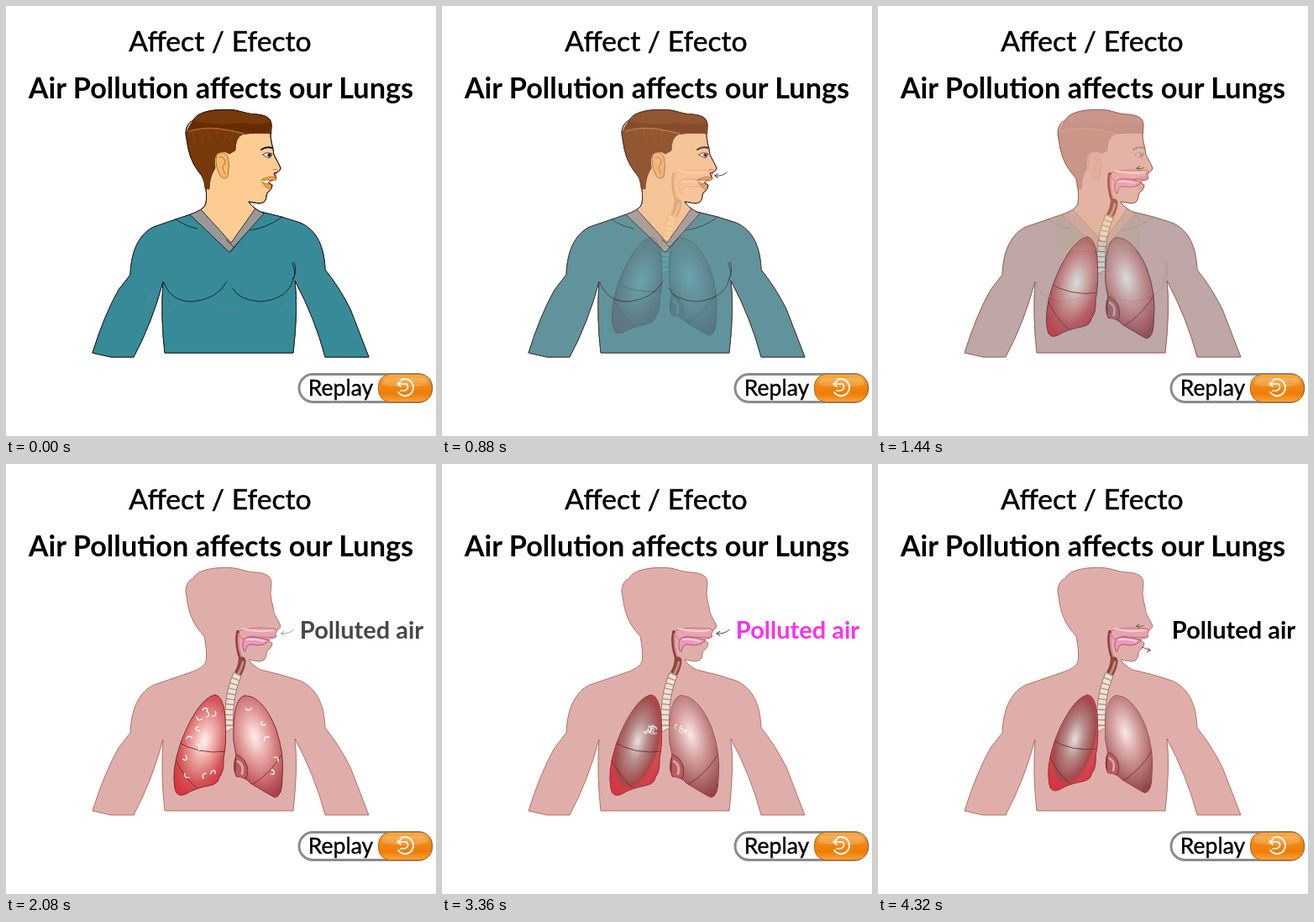
Recreate the animation shown at these times as an HTML page. Size 512 px wide and 512 px high, loop 4.4 s.

```html
<!DOCTYPE html>
<html lang="en">
<head>
<meta charset="utf-8">
<title>Affect / Efecto</title>
<style>
  html, body { margin: 0; width: 100%; height: 100%; overflow: hidden; background: #fff; }
  svg { display: block; width: 100vw; height: 100vh; }
  text { font-family: Lato, "Open Sans", sans-serif; text-anchor: middle; }
  .line { fill: none; stroke-linecap: round; stroke-linejoin: round; }
</style>
</head>
<body>
<svg viewBox="0 0 512 512">
  <defs>
    <path id="body" d="M214 152C214 142 219 138 223 136C228 126 246 123 264 123.500C277 123 285 129 298 129
      C309 130 316 133 316 142L315 155Q316 164 318 170Q318 177 321 181Q325 188 327 193Q326 198 319 199
      Q320 202 322 205Q320 208 313 208Q310 210 317 213Q317 217 314 220Q310 222 310 226Q310 235 301 235L289 233
      Q292 239 303 245Q327 250 350 258C371 267 379 288 380 314Q397 335 410 361L432 418L380 418Q368 372 344 327
      Q348 360 342 413L189 413Q184 370 187 328Q174 377 152 418L125 418L103 413Q117 368 134 338L148 320
      C149 288 161 270 176 263L214 250Q237 243 238 235Q240 225 236 205Q221 190 217 170Z"/>
    <clipPath id="inBody"><use href="#body"/></clipPath>
    <path id="lungL" d="M249 275C233 277 216 309 207 335Q197 365 201 386Q203 398 214 393Q225 386 242 383Q253 381 254 373
      Q260 366 259 350Q263 335 261 300Q258 275 249 275Z"/>
    <path id="lungR" d="M284 276C273 277 270 303 271 330L274 347Q269 360 274 372Q286 373 291 380Q309 391 320 397
      Q329 396 329 374Q332 345 321 314C311 290 298 275 284 276Z"/>
    <clipPath id="inL"><use href="#lungL"/></clipPath>
    <clipPath id="inR"><use href="#lungR"/></clipPath>
    <radialGradient id="redL" gradientUnits="userSpaceOnUse" cx="0" cy="0" r="1" gradientTransform="translate(236 330) rotate(14) scale(36 68)">
      <stop offset="0" stop-color="#fff3ef"/><stop offset=".35" stop-color="#eda9a4"/>
      <stop offset=".75" stop-color="#d45458"/><stop offset="1" stop-color="#d93440"/>
    </radialGradient>
    <radialGradient id="redR" gradientUnits="userSpaceOnUse" cx="0" cy="0" r="1" gradientTransform="translate(296 325) rotate(-14) scale(38 72)">
      <stop offset="0" stop-color="#fff0ee"/><stop offset=".4" stop-color="#e6a3a2"/>
      <stop offset=".8" stop-color="#c65f64"/><stop offset="1" stop-color="#a94349"/>
    </radialGradient>
    <radialGradient id="dirtL" gradientUnits="userSpaceOnUse" cx="0" cy="0" r="1" gradientTransform="translate(233 330) rotate(14) scale(28 62)">
      <stop offset="0" stop-color="#e9dedb"/><stop offset=".4" stop-color="#b58b89"/>
      <stop offset=".85" stop-color="#a1494b"/><stop offset="1" stop-color="#d6343f" stop-opacity=".4"/>
    </radialGradient>
    <radialGradient id="dirtR" gradientUnits="userSpaceOnUse" cx="0" cy="0" r="1" gradientTransform="translate(296 322) rotate(-14) scale(38 76)">
      <stop offset="0" stop-color="#f9e8e6"/><stop offset=".4" stop-color="#d5a09f"/><stop offset="1" stop-color="#934449"/>
    </radialGradient>
    <linearGradient id="orange" x2="0" y2="1">
      <stop offset="0" stop-color="#f7b04a"/><stop offset=".35" stop-color="#f28a18"/>
      <stop offset=".7" stop-color="#ee7d08"/><stop offset="1" stop-color="#fba43a"/>
    </linearGradient>
  </defs>

  <rect width="512" height="512" fill="#fff"/>
  <text x="255" y="53.500" font-size="33.700" stroke="#000" stroke-width=".5">Affect / Efecto</text>
  <text x="256" y="110" font-size="34.300" font-weight="700">Air Pollution affects our Lungs</text>

  <use href="#body" fill="#e0aeaa" stroke="#a5574a" stroke-width=".8"/>

  <g id="airway" class="line">
    <path d="M276 200Q285 193 320 196L323 199Q319 204 322 206Q302 207 291 205L282 209Z" fill="#e9a3ae" stroke="#b96673" stroke-width=".8"/>
    <path d="M282 196Q299 201 318 198" stroke="#f6cdd3" stroke-width="2"/>
    <path d="M283 222Q278 205 294 206Q306 207 314 210Q305 218 295 215Q286 213 285 223Z" fill="#eb9abb" stroke="#a94e70" stroke-width=".9"/>
    <path d="M286 209Q297 208 307 211" stroke="#f8cfdd" stroke-width="2"/>
    <path d="M276 200Q273 215 280 234" stroke="#8f3b46" stroke-width="4"/>
    <path d="M277 202Q275 215 280 229" stroke="#d88a91" stroke-width="1.800"/>
    <path d="M281 234Q281 241 276 250" stroke="#8d4841" stroke-width="9"/>
    <path d="M282 236Q281 242 277 249" stroke="#c98a7c" stroke-width="3"/>
    <path d="M276 250Q265 272 265.500 312" stroke="#9b776c" stroke-width="11" stroke-linecap="butt"/>
    <path d="M276 250Q265 272 265.500 312" stroke="#eee0d5" stroke-width="9" stroke-linecap="butt"/>
    <path d="M276 250Q265 272 265.500 312" stroke="#a78578" stroke-width="9.500" stroke-linecap="butt" stroke-dasharray="1.200 5"/>
    <path d="M258 313Q265 310 271 312L272 316Q266 314 264 319Z" fill="#eee0d5" stroke="#9b776c" stroke-width=".8"/>
  </g>

  <g id="lungs" class="line" stroke="#6e2a2d" stroke-width=".9">
    <use href="#lungL" fill="url(#redL)"/>
    <use href="#lungR" fill="url(#redR)"/>
    <g class="dirt" stroke="none">
      <use href="#lungL" fill="url(#dirtL)"/>
      <use href="#lungR" fill="url(#dirtR)"/>
    </g>
    <g clip-path="url(#inL)">
      <path d="M201 329Q229 347 263 342M201 350Q209 370 227 386"/>
    </g>
    <g clip-path="url(#inR)">
      <path d="M331 342Q316 368 293 382"/>
      <path d="M274 346C285 349 291 363 286 374Q279 376 273 371Z" fill="#b85c61"/>
      <path d="M276 354Q284 358 281 369" stroke="#e0a1a1" stroke-width="3"/>
    </g>
  </g>
  <g id="specks" class="line" stroke="#fff" stroke-width="1.300"></g>

  <rect id="patch" x="212" y="249" width="100" height="42" fill="#d4b07c"/>

  <g id="clothed" class="line" stroke="#111" stroke-width=".8">
    <use href="#body" fill="#fdcc93"/>
    <g clip-path="url(#inBody)">
      <path d="M90 430V235L219 246L267 293L305 246L445 235V430Z" fill="#378b98"/>
      <path d="M218 247L230 240L268 282L297 241L307 247L266 293Z" fill="#999"/>
      <path d="M262 278L271 287"/>
    </g>
    <use href="#body" fill="none"/>
    <path d="M188 329Q196 352 222 352Q252 349 263 328M270 336Q276 350 303 352Q336 349 342 325Q347 314 343 305M341 306Q347 323 341 325
      M202 254Q215 263 228 265M291 267Q311 264 329 251"/>
    <path d="M174 339Q171 351 162 366M190 350Q191 360 197 365M257 363Q265 361 273 363M334 353Q333 360 328 364M352 338L364 366" stroke="#668087"/>
    <path d="M215 151Q218 141 224 136C230 126 249 123 264 124C278 124 286 129 298 129Q316 131 316 142V152
      Q296 150 281 153Q273 157 273 172L266 176Q260 171 251 176Q247 181 249 193Q242 204 242 218L237 217Q236 204 228 195Q217 181 215 151Z" fill="#78390a" stroke="#4a2103"/>
    <path d="M222 136Q237 143 283 139Q299 143 315 138Q316 147 314 151Q288 153 265 148Q238 143 218 149Z" fill="#652b03" stroke="none"/>
    <path d="M219 149Q240 142 271 149L283 152" stroke="#b56820" stroke-width="1.500"/>
    <path d="M222 152L226 163M230 149L234 162M240 149L243 160M251 149L252 158M262 150L261 160M270 151L267 160" stroke="#8f4a12"/>
    <path d="M251 177Q257 171 264 179Q267 190 264 203Q260 208 255 202Q248 189 251 177Z" fill="#f7b96d" stroke="#9c581b"/>
    <path d="M254 180Q261 178 261 188Q255 190 261 200" stroke="#a9642c"/>
    <path d="M304 171Q310 167 317 169" stroke-width="2"/>
    <path d="M306 177Q310 173 317 176L314 181Q309 180 306 177Z" fill="#fff"/>
    <circle cx="313.500" cy="177.500" r="1.800" fill="#223"/>
    <path d="M318 195Q322 193 325 197" stroke="#a9642c"/>
    <path d="M304 207Q313 202 321 204L322 207L313 208Z" fill="#eca04b" stroke="#b5651d"/>
    <path d="M304 208L314 208L310 212Z" fill="#fff" stroke="none"/>
    <path d="M305 210L316 213L315 219Q309 217 305 210Z" fill="#eca04b" stroke="#b5651d"/>
  </g>

  <g id="inhaled" class="line" stroke-width="1"><path id="tail"/><path d="M4 -2.500L0 0L4 2.500"/></g>
  <g id="exhaled" class="line" stroke="#8b3558" stroke-width="1"><path d="M-10 -4Q-4 -1 0 0M-3 -3L0 0L-4 2"/></g>

  <text id="label" x="423.500" y="208" font-size="29" font-weight="700">Polluted air</text>

  <rect x="349" y="438.500" width="158" height="33" rx="16.500" fill="#fff" stroke="#8c8c8c" stroke-width="3"/>
  <text x="398.500" y="463.500" font-size="26.500" stroke="#000" stroke-width=".4">Replay</text>
  <rect x="443.500" y="438.500" width="63.500" height="33" rx="14" fill="url(#orange)" stroke="#b46a20" stroke-width="1"/>
  <path d="M453 443H497Q503 444 503 451Q475 456 448 451Q448 444 453 443Z" fill="#fff" opacity=".18"/>
  <g class="line" stroke="#fff" stroke-width="2">
    <path d="M471 445A10 10 0 1 1 467 460"/>
    <path d="M466 450H477Q481 455 475 458H470M470 447L466 450L470 453" stroke-width="1.700"/>
  </g>
</svg>
<script>
const LOOP = 4400, STEP = 80;
const $ = id => document.getElementById(id);

// Value of a piecewise linear track of [time, value] steps.
function track(t, steps) {
  if (t <= steps[0][0]) return steps[0][1];
  for (let i = 1; i < steps.length; i++) {
    const [t0, v0] = steps[i - 1], [t1, v1] = steps[i];
    if (t < t1) return v0 + (v1 - v0) * (t - t0) / (t1 - t0);
  }
  return steps[steps.length - 1][1];
}

const reveal = [[620, 0], [1640, 1]];
const breath = [[640, 0], [1600, 1], [3600, 1], [4400, 0]];
const dirt = [[2080, 0], [3200, 1]];
const spread = [[1500, 0], [2080, 1], [2640, 1], [3360, .3], [3680, 0]];
const speckAlpha = [[1540, 0], [1760, 1], [3360, 1], [3600, 0]];
const labelAlpha = [[1680, 0], [2240, 1]];
const labelPink = [[3080, 0], [3320, 1], [3600, 1], [3840, 0]];
const trips = [[640, 1500], [1900, 2900], [3100, 4400]];

const spots = [[237, 291], [248, 298], [230, 304], [228, 316], [218, 325], [229, 337], [214, 351],
  [215, 371], [236, 370], [246, 367], [240, 299], [289, 291], [306, 309], [310, 327], [322, 352], [318, 366]];
const specks = spots.map(([x, y], i) => {
  const el = document.createElementNS("http://www.w3.org/2000/svg", "path");
  el.setAttribute("d", i % 3 ? "M-3 -2Q3 -3 2 3" : "M-3 1Q0 -3 3 0L2 3");
  $("specks").append(el);
  return { el, x, y, turn: i * 77 };
});

function place(el, x, y, more = "") {
  el.setAttribute("transform", `translate(${x} ${y}) ${more}`);
}

function drawSpecks(t) {
  const s = track(t, spread);
  $("specks").setAttribute("opacity", track(t, speckAlpha));
  for (const { el, x, y, turn } of specks) {
    const drift = Math.sin(t / 260 + turn);
    const gap = x < 264 ? -8 : 10;
    place(el, 264 + gap + (x - 264 - gap) * s, 315 + (y - 315) * s * s + drift * s,
      `rotate(${turn * s}) scale(1 ${.3 + .7 * s})`);
  }
}

function drawAir(t) {
  const trip = trips.find(([from, to]) => t >= from && t < to);
  $("inhaled").setAttribute("opacity", trip ? 1 : 0);
  if (trip) {
    const p = (t - trip[0]) / (trip[1] - trip[0]);
    const length = 17 - 9 * p;
    place($("inhaled"), 332 - 26 * p, p < .55 ? 201 + 4 * p : 209 - 17 * p);
    $("tail").setAttribute("d", `M0 0Q${length * .7} 1 ${length} ${-6 * (1 - p)}`);
    $("inhaled").setAttribute("stroke", trip[0] === 1900 ? "#9aabb0" : p > .6 ? "#71633d" : "#444");
  }
  const out = track(t, [[3760, 0], [4400, 1]]);
  $("exhaled").setAttribute("opacity", Math.min(1, out * 4));
  place($("exhaled"), 306 + 21 * out, 214 + 9 * out);
}

function draw(t) {
  const k = track(t, reveal);
  const size = .95 + .05 * track(t, breath);
  $("clothed").setAttribute("opacity", 1 - k);
  $("patch").setAttribute("opacity", 1.5 * k * (1 - k));
  $("lungs").setAttribute("transform", `translate(264 275) scale(${size}) translate(-264 -275)`);
  document.querySelector(".dirt").setAttribute("opacity", track(t, dirt));
  drawSpecks(t);
  drawAir(t);
  const pink = track(t, labelPink);
  $("label").setAttribute("opacity", track(t, labelAlpha));
  $("label").setAttribute("fill", `rgb(${250 * pink},${50 * pink},${238 * pink})`);
}

const start = performance.now();
function tick() {
  const t = (performance.now() - start) % LOOP;
  draw(Math.floor(t / STEP) * STEP);
  requestAnimationFrame(tick);
}
tick();
</script>
</body>
</html>
```
